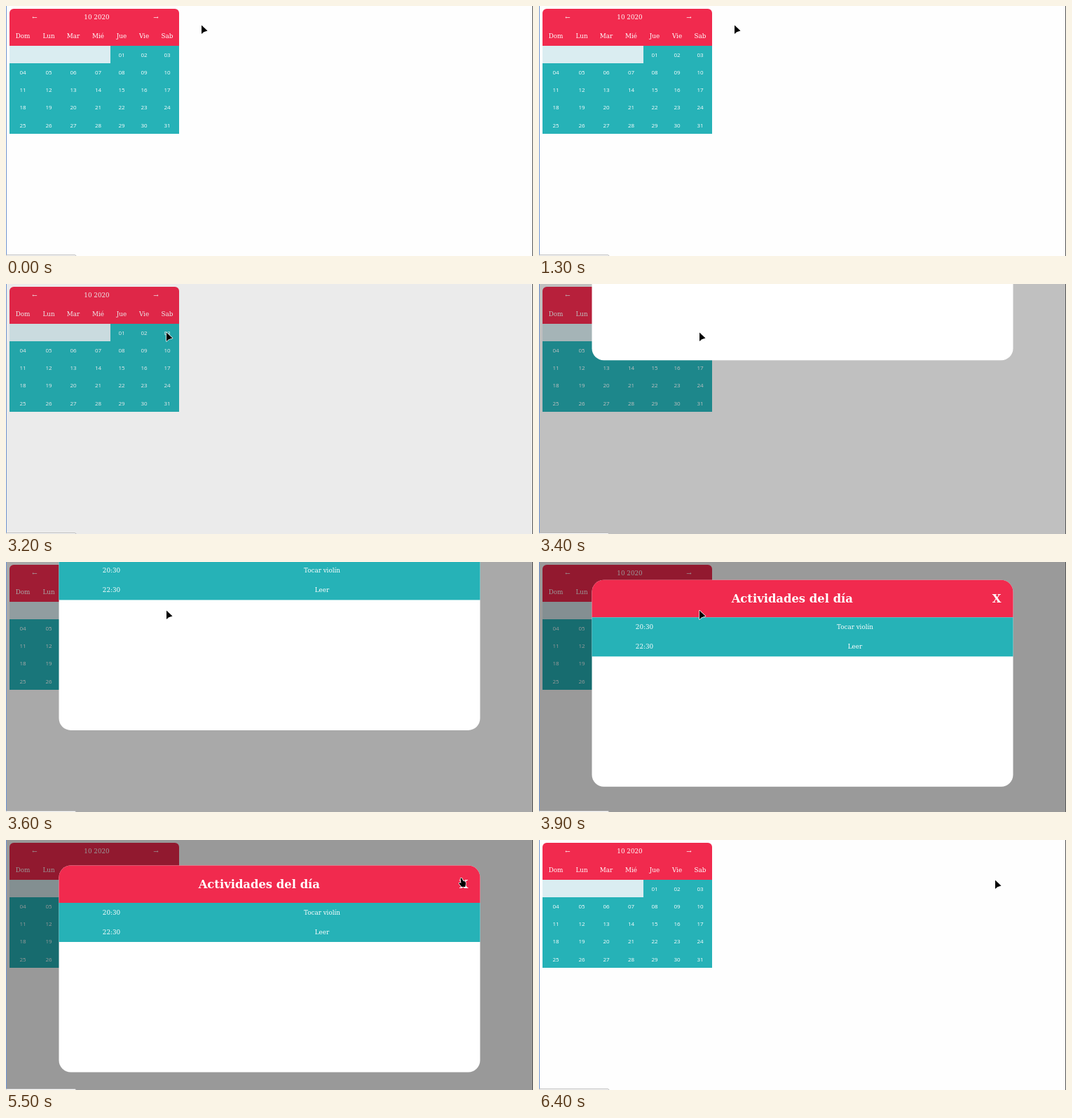
Animation, 752 px wide and 358 px high, one loop 7600 ms. Source, as an HTML page:

```html
<!DOCTYPE html>
<html lang="es">
<head>
<meta charset="utf-8">
<title>Calendario</title>
<style>
  html, body { margin: 0; width: 100%; height: 100%; overflow: hidden; background: #fefefe; }
  svg { display: block; width: 752px; height: 358px; }
  text { font: 8.8px "DejaVu Serif", serif; fill: #fff; text-anchor: middle; }
  .date { font: 8px "Open Sans", sans-serif; }
  .title { font-size: 16.4px; font-weight: bold; }
  .red { fill: #f12a4e; }
  .teal { fill: #26b2b7; }
  #cursor path { stroke: #fff; stroke-width: 1.4; paint-order: stroke; stroke-linejoin: round; }
</style>
</head>
<body>
<svg viewBox="0 0 752 358">
  <g id="calendar">
    <path class="red" d="M5 57V10a6 6 0 0 1 6-6H241a6 6 0 0 1 6 6V57Z"/>
    <rect class="teal" x="5" y="57" width="242" height="126"/>
    <rect x="5" y="57" width="144" height="25" fill="#daedf1"/>
  </g>
  <rect id="shade" width="752" height="358"/>
  <g id="modal">
    <rect width="601" height="296" rx="17" fill="#fff"/>
    <path class="red" d="M0 53.5V17a17 17 0 0 1 17-17H584a17 17 0 0 1 17 17V53.5Z"/>
    <rect class="teal" y="53.5" width="601" height="56"/>
  </g>
  <path d="M.5 0V358" stroke="#6f93cf"/>
  <path d="M751.5 0V358" stroke="#555"/>
  <path d="M0 356.5H98q2 0 2 2H0Z" fill="#fff" stroke="#bbb"/>
  <g id="cursor">
    <path id="arrow" d="M0 .5V13L3.2 10.2 8.5 8.6Z"/>
    <path id="hand" d="M-2.5-2q1.5-1.2 2.3.4L1.2 1.5 3.6 2.2Q5.3 3 5 5.5L4.3 10H-.8L-4.4 5.4Q-4.6 3.8-3 4L-1.6 5Z"/>
  </g>
</svg>
<script>
const LOOP = 7600, STEP = 100, CLOSE = 6300;
const $ = id => document.getElementById(id);

function label(parent, str, x, y, cls = "") {
  const el = document.createElementNS("http://www.w3.org/2000/svg", "text");
  el.textContent = str;
  el.setAttribute("x", x);
  el.setAttribute("y", y);
  el.setAttribute("class", cls);
  $(parent).append(el);
}

const columns = [24, 61, 96, 131.5, 165, 197, 230];
label("calendar", "←", 41, 19.4);
label("calendar", "10 2020", 129.5, 19.4);
label("calendar", "→", 214, 19.4);
["Dom", "Lun", "Mar", "Mié", "Jue", "Vie", "Sab"].forEach((d, i) => label("calendar", d, columns[i], 46.3));
for (let day = 1; day <= 31; day++) {
  const cell = day + 3;
  label("calendar", String(day).padStart(2, "0"), columns[cell % 7], 73 + 25.15 * Math.floor(cell / 7), "date");
}

label("modal", "Actividades del día", 285.8, 32.6, "title");
label("modal", "X", 577.5, 32.6, "title");
[["20:30", "Tocar violín"], ["22:30", "Leer"]].forEach(([hour, task], i) => {
  label("modal", hour, 75, 70.4 + 28 * i);
  label("modal", task, 375.5, 70.4 + 28 * i);
});

// CSS "ease", solved by bisection
function ease(x) {
  if (x <= 0) return 0;
  if (x >= 1) return 1;
  let lo = 0, hi = 1, s;
  for (let i = 0; i < 24; i++) {
    s = (lo + hi) / 2;
    if (0.75 * s * (1 - s) + s ** 3 < x) lo = s; else hi = s;
  }
  return 0.3 * s * (1 - s) ** 2 + 3 * s * s * (1 - s) + s ** 3;
}

// time, x, y
const path = [
  [1600, 279, 27], [2300, 248, 46], [2600, 206, 84], [2800, 229, 69],
  [4400, 229, 69], [5300, 651, 57]
];

function pointer(t) {
  const next = path.findIndex(p => p[0] > t);
  if (next === 0) return path[0].slice(1);
  if (next < 0) return path[path.length - 1].slice(1);
  const [t0, x0, y0] = path[next - 1], [t1, x1, y1] = path[next];
  const u = (t - t0) / (t1 - t0), k = u * u * (3 - 2 * u);
  return [x0 + (x1 - x0) * k, y0 + (y1 - y0) * k];
}

function draw(now) {
  const t = Math.floor(now % LOOP / STEP) * STEP;
  const open = t < CLOSE;
  const drop = open ? ease((t - 3012) / 1075) : 0;
  $("shade").setAttribute("opacity", open ? 0.4 * ease((t - 3050) / 1000) : 0);
  $("modal").setAttribute("transform", `translate(75.5 ${36.5 - 592 * (1 - drop)})`);
  const [x, y] = pointer(t);
  const overClose = x > 645 && t <= CLOSE;
  $("cursor").setAttribute("transform", `translate(${x} ${y})`);
  $("arrow").style.display = overClose ? "none" : "";
  $("hand").style.display = overClose ? "" : "none";
}

const start = performance.now();
function tick() {
  draw(performance.now() - start);
  requestAnimationFrame(tick);
}
tick();
</script>
</body>
</html>
```
